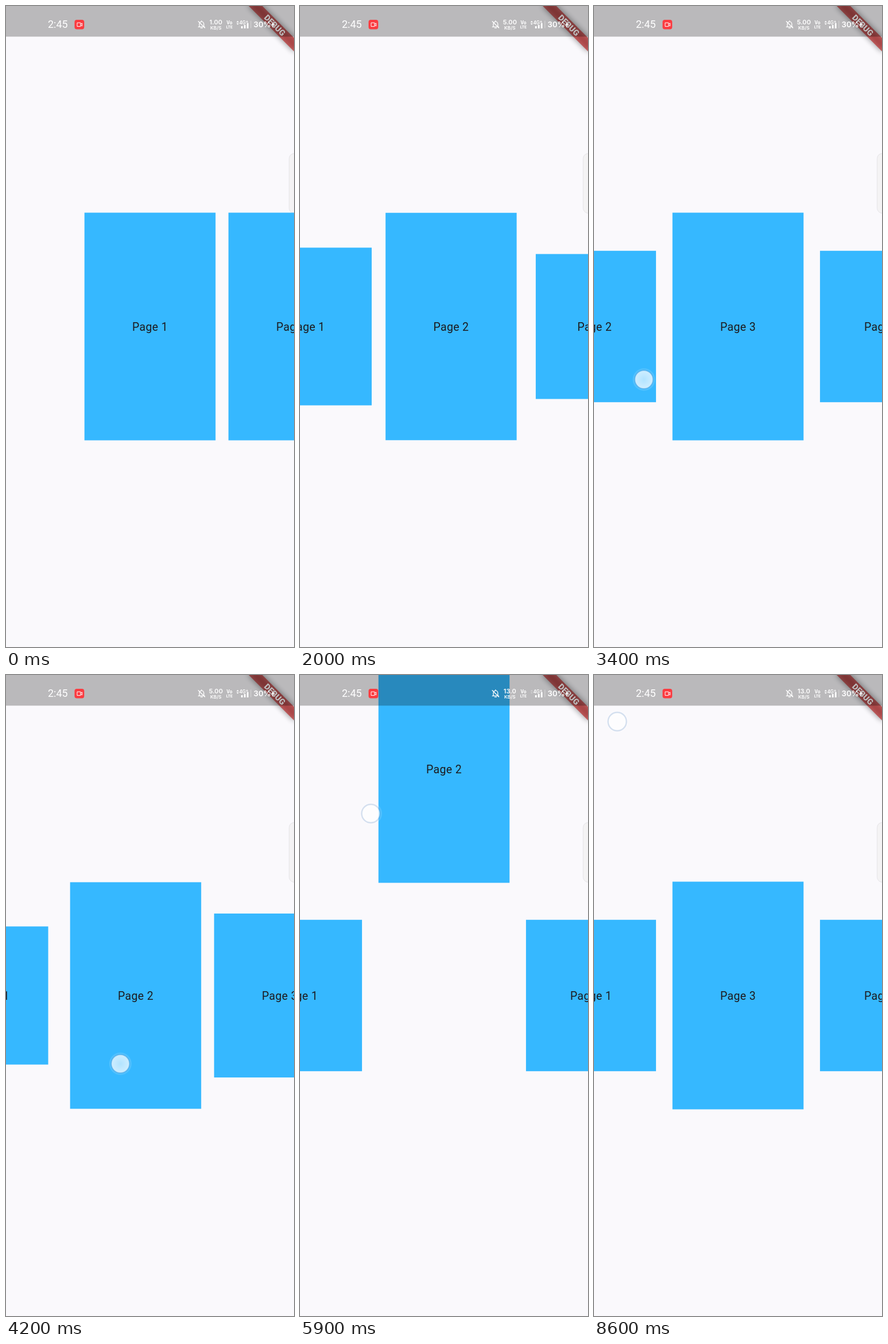
An HTML page for the animation above (8700 ms loop, 502x1115 px).

```html
<!DOCTYPE html>
<html lang="en">
<head>
<meta charset="utf-8">
<title>Page carousel</title>
<style>
  html, body { margin: 0; width: 100%; height: 100%; overflow: hidden; background: #faf9fc; }
  svg { display: block; width: 100%; height: 100%; }
  text { font-family: Roboto, sans-serif; }
  .card text { font-size: 19.5px; letter-spacing: .35px; fill: #1d1b20; text-anchor: middle; }
  .status text { fill: #fff; }
  .bold { font-family: Inter, sans-serif; font-weight: 600; }
  .mid { text-anchor: middle; }
</style>
</head>
<body>
<svg viewBox="0 0 502 1115">
  <defs>
    <filter id="soft" x="-20%" y="-150%" width="140%" height="400%">
      <feGaussianBlur stdDeviation="5.5"/>
    </filter>
    <radialGradient id="dot">
      <stop offset="0" stop-color="#fff" stop-opacity=".56"/>
      <stop offset="1" stop-color="#fff" stop-opacity=".72"/>
    </radialGradient>
  </defs>
  <rect width="502" height="1115" fill="#faf9fc"/>
  <rect x="493.5" y="256.5" width="30" height="104" rx="9" fill="#f4f3f4" stroke="#e6e5e8"/>
  <g id="cards"></g>

  <g transform="translate(502 0) rotate(45)">
    <rect x="-55.8" y="39" width="111.6" height="16.8" fill="#000" opacity=".45" filter="url(#soft)"/>
    <rect x="-55.8" y="39" width="111.6" height="16.8" fill="#b71c1c" opacity=".63"/>
    <text class="mid" y="52.4" font-size="14.2" font-weight="900" fill="#fff">DEBUG</text>
  </g>

  <rect width="502" height="53.3" opacity=".26"/>
  <g class="status">
    <text x="73" y="38" font-size="18">2:45</text>
    <rect x="119.5" y="24" width="16.8" height="16.6" rx="4" fill="#fb3b40"/>
    <path d="M124 29.2h6v6.4h-6zM130 31.6l2.7-1.7v5l-2.7-1.7" fill="none" stroke="#fff" stroke-width="1"/>
    <path d="M335.2 36.3h11.2M337 36v-4.4a3.9 4.4 0 0 1 7.8 0V36M340.9 27.2v-1.6M339.5 38.4h2.8M335.2 26.8l11.4 11.2"
      fill="none" stroke="#fff" stroke-width="1.3" stroke-linecap="round"/>
    <text id="speed" class="bold mid" x="365.8" y="32" font-size="11"></text>
    <text class="bold mid" x="365.8" y="40.5" font-size="8.2">KB/S</text>
    <text class="mid" x="389.4" y="31.6" font-size="8.4" font-weight="700">Vo</text>
    <text class="mid" x="389.4" y="39.4" font-size="6.9" font-weight="700">LTE</text>
    <path id="arrows" d="M401.6 28.4l2.2-2.6 2.2 2.6zM401.6 30.2l2.2 2.6 2.2-2.6z" fill="#fff"/>
    <text x="406.8" y="32.4" font-size="8.8" font-weight="500">4G</text>
    <text x="418" y="29.6" font-size="7.5" font-weight="500">+</text>
    <path d="M409.8 35h2.8v4h-2.8zM414.8 33h2.8v6h-2.8zM419.8 29.5h2.8v9.5h-2.8z" fill="#fff"/>
    <path d="M426 25.5h1.6v13H426z" fill="#fff" opacity=".3"/>
    <text class="bold" x="431.5" y="36.8" font-size="13.2">30%</text>
    <path d="M466 26.5l-3.6 6.2h2.4l-.6 5.6 3.8-6.6h-2.4z" fill="#fff" opacity=".9"/>
  </g>

  <g id="touch">
    <circle r="19.5" fill="#fff" opacity=".13"/>
    <circle r="15.5" fill="url(#dot)"/>
    <circle r="16" fill="none" stroke="#5a8cbe" stroke-opacity=".24" stroke-width="2.4"/>
  </g>
</svg>
<script>
const LOOP = 8700, STEP = 100;
const PITCH = 251, MID_X = 251, MID_Y = 557.5;
const CARD_W = 228.5, CARD_H = 396, GROW_W = 325;
const FIRST_SCROLL = 1450, GONE = 6000, REFLOW = 6400;

// start, direction, speed
const swipes = [[1450, 1, 1], [2450, 1, 1], [3400, -1, 1.5], [4130, 1, 1.4], [4659, -1, 1]];

// down, up, start x, y, end x, y
const touches = [
  [1360, 1660, 271, 690, 155, 668],
  [2360, 2650, 215, 682, 84, 654],
  [3340, 3580, 80, 649, 192, 660],
  [4060, 4280, 250, 686, 125, 662],
  [4560, 4835, 190, 656, 337, 672],
  [5660, 5900, 170, 640, 123.5, 241],
  [7660, 7830, 40.5, 81, 40.5, 81],
  [8460, 9000, 40.5, 81, 40.5, 81]
];

const $ = id => document.getElementById(id);
const clamp = v => Math.max(0, Math.min(1, v));
const mix = (a, b, f) => a + (b - a) * f;

function make(tag, parent) {
  return parent.appendChild(document.createElementNS("http://www.w3.org/2000/svg", tag));
}

const cards = [1, 2, 3, 4, 5].map(n => {
  const g = make("g", $("cards"));
  g.setAttribute("class", "card");
  const box = make("rect", g), label = make("text", g);
  box.setAttribute("fill", "#36b8ff");
  label.setAttribute("y", 7);
  label.textContent = "Page " + n;
  return { n, g, box };
});

// cubic-bezier(0, 0, .58, 1)
function easeOut(x) {
  let lo = 0, hi = 1;
  for (let i = 0; i < 24; i++) {
    const m = (lo + hi) / 2;
    if (1.74 * m * m - .74 * m ** 3 < x) lo = m; else hi = m;
  }
  return 3 * lo * lo - 2 * lo ** 3;
}

// finger drag, then a damped spring to the next page
function swipeProgress(u) {
  if (u <= 0) return 0;
  if (u < 200) return .35 * (u / 200) ** 1.76;
  const v = u - 200;
  const rest = (.65 + .0037 * v) * Math.exp(-.0105 * v);
  return rest < .01 ? 1 : 1 - rest;
}

function drawCards(t) {
  const scroll = swipes.reduce((s, [t0, dir, k]) => s + dir * swipeProgress((t - t0) * k), 0);
  const lift = 394 * clamp((t - 5660) / 240) ** 2;
  for (const { n, g, box } of cards) {
    const index = n - 1 - (t >= REFLOW && n > 2 ? 1 : 0);
    const d = index - scroll;
    const size = t < FIRST_SCROLL ? 1 : easeOut(clamp(1 - .518 * Math.abs(d)));
    const w = Math.min(CARD_W, GROW_W * size), h = CARD_H * size;
    const y = MID_Y - (n === 2 ? lift : 0);
    g.setAttribute("transform", `translate(${MID_X + d * PITCH} ${y})`);
    g.setAttribute("visibility", n === 2 && t >= GONE ? "hidden" : "visible");
    box.setAttribute("x", -w / 2);
    box.setAttribute("y", -h / 2);
    box.setAttribute("width", w);
    box.setAttribute("height", h);
  }
}

function drawTouch(t) {
  let alpha = 0;
  for (const [down, up, x0, y0, x1, y1] of touches) {
    const a = Math.min(clamp((t - down + 60) / 100), clamp(1 - (t - up) / 150));
    if (t < down || a <= 0) continue;
    const f = clamp((t - down) / (up - down)) ** 2;
    alpha = a;
    $("touch").setAttribute("transform", `translate(${mix(x0, x1, f)} ${mix(y0, y1, f)})`);
  }
  $("touch").setAttribute("opacity", alpha);
}

function drawStatus(t) {
  $("speed").textContent = t < 2000 ? "1.00" : t < 5800 ? "5.00" : "13.0";
  const idle = (t >= 200 && t < 2000) || (t >= 4300 && t < 7300);
  $("arrows").setAttribute("opacity", idle ? .3 : 1);
}

function draw(ms) {
  const t = Math.floor((ms % LOOP) / STEP) * STEP;
  drawCards(t);
  drawTouch(t);
  drawStatus(t);
}

const begin = performance.now();
function tick() {
  draw(performance.now() - begin);
  requestAnimationFrame(tick);
}
tick();
</script>
</body>
</html>
```
